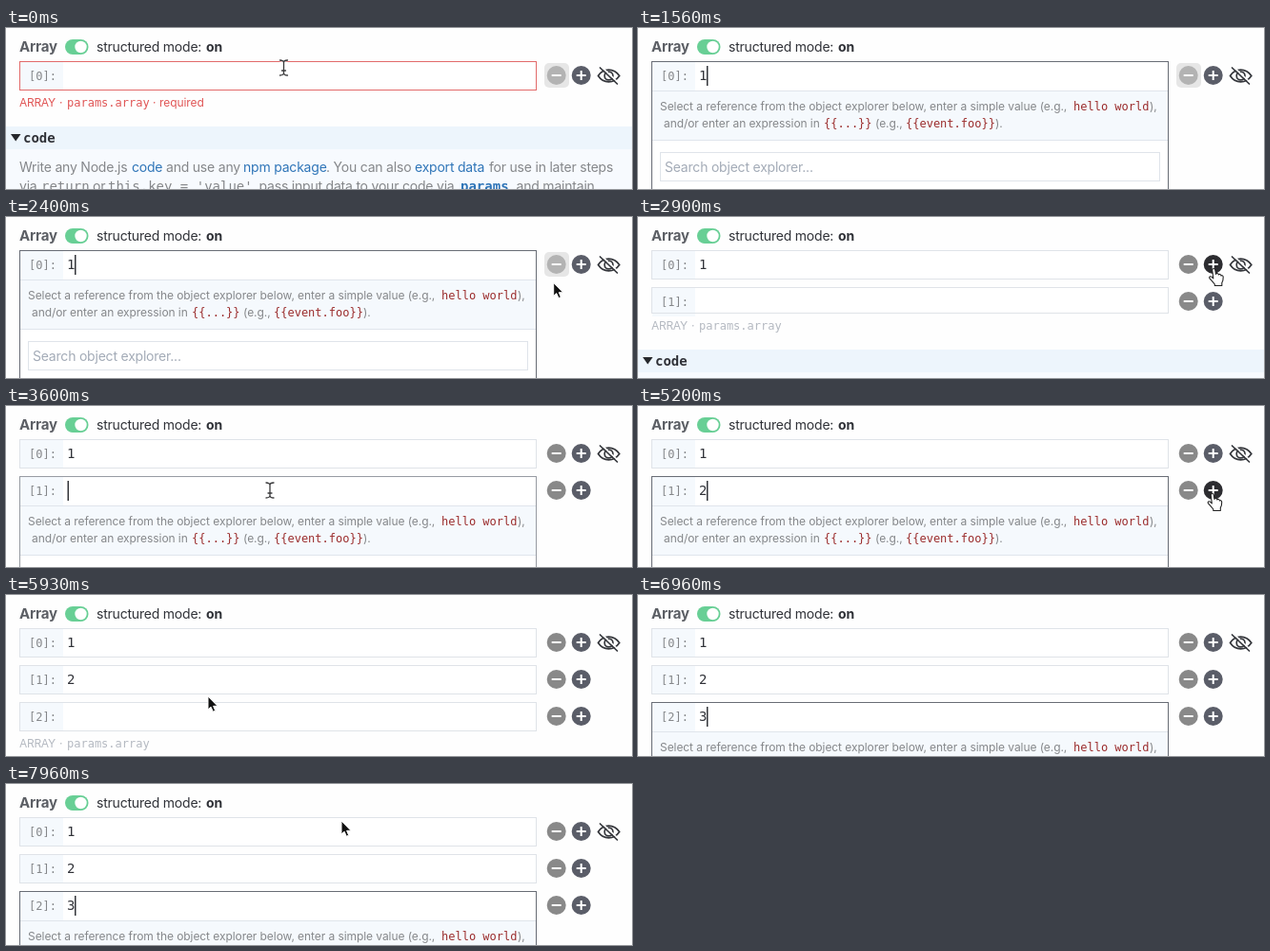
Animation, 657 px wide and 170 px high, one loop 8 s. Source, as an HTML page:

```html
<!DOCTYPE html>
<html lang="en">
<head>
<meta charset="utf-8">
<title>Structured array input</title>
<style>
  html, body { margin: 0; width: 100%; height: 100%; overflow: hidden; background: #fefefe; }
  svg { display: block; width: 657px; height: 170px; }
  text { font: 14px Inter, sans-serif; letter-spacing: -.21px; fill: #85878a; }
  .dark { fill: #303238; }
  .bold { font-weight: 700; }
  .title { font-size: 15px; font-weight: 700; fill: #5c5f65; }
  .small { font-size: 12px; letter-spacing: -.07px; }
  .caps { font-size: 12px; letter-spacing: -.3px; }
  .mono { font-family: "DejaVu Sans Mono", monospace; letter-spacing: 0; }
  .mono12 { font: 12px "DejaVu Sans Mono", monospace; letter-spacing: 0; }
  .link { fill: #2f75b8; }
  .ref { fill: #9b2c2c; }
  .hint { fill: #a3abb7; }
</style>
</head>
<body>
<svg id="stage" viewBox="0 0 657 170" xmlns="http://www.w3.org/2000/svg"></svg>
<script>
(() => {
const LOOP = 8000;
const PITCH = 38.8;
const GREY = [223, 227, 232], RED = [226, 106, 106], DARK = [104, 108, 117];

// Times at which each row is added, focused, typed into and left.
const rows = [
  { added: -1, focus: 460, caretOff: 930, typed: 1400, blur: 2760 },
  { added: 2900, focus: 3540, caretOff: LOOP, typed: 3900, blur: 5260 },
  { added: 5400, focus: 6310, caretOff: LOOP, typed: 6900, blur: LOOP }
];

// Pointer stops: time, x, y; the pointer hides while typing.
const stops = [
  [0, 291.5, 42], [30, 291, 42.5], [130, 286, 46], [1700, 286, 46], [1960, 545, 84],
  [2160, 545, 84], [2640, 604, 55], [2900, 604.5, 55], [3260, 400, 84],
  [3460, 400, 84], [3600, 277, 89], [4160, 277, 89], [4460, 503, 107],
  [4660, 503, 107], [5120, 603, 93], [5400, 603, 93], [5930, 212, 107],
  [6060, 190, 112], [6200, 190, 112], [6360, 184, 128], [7300, 184, 128],
  [7530, 318, 140], [7700, 318, 140], [7940, 352, 39], [8000, 352, 39]
];
const hidden = [[1400, 1700], [3930, 4160], [6930, 7300]];

const stage = document.getElementById('stage');
const label = (cls, x, y, s) => `<text class="${cls}" x="${x}" y="${y}">${s}</text>`;
const rowTop = i => Math.round(PITCH * i);

const header = `
  ${label('title', 14, 25, 'Array')}
  <rect x="62" y="12" width="24.5" height="16" rx="8" fill="#68cf95"/>
  <circle cx="78.5" cy="20" r="6.2" fill="#fff"/>
  ${label('dark', 95, 25, 'structured mode:')}
  ${label('dark bold', 210, 25, 'on')}
  <g fill="none" stroke="#34363b" stroke-width="1.7" stroke-linecap="round">
    <path d="M621.5 50.5C627 42 638 42 643.8 50.5C638 59 627 59 621.5 50.5Z"/>
    <circle cx="632.6" cy="50.5" r="4.4"/>
    <path d="M625 41.2L643 58" stroke="#fefefe"/>
    <path d="M623.5 42L641.5 59"/>
  </g>`;

const footer = `
  <g id="caption">
    ${label('caps', 14, 83, 'ARRAY')}${label('small', 56, 83, '·')}
    ${label('mono12', 64, 83, 'params.array')}
    <g id="required">${label('small', 154, 83, '·')}${label('small', 161, 83, 'required')}</g>
  </g>
  <rect y="104" width="657" height="24" fill="#edf5fc"/>
  <rect y="128" width="657" height="42" fill="#f7fafe"/>
  <path d="M5 112H15.5L10.2 119.5Z" fill="#26282c"/>
  ${label('mono bold dark', 18, 121, 'code')}
  ${label('', 14, 152, 'Write any Node.js')}
  ${label('link', 132, 152, 'code')}
  ${label('', 168, 152, 'and use any')}
  ${label('link', 249, 152, 'npm package')}
  ${label('', 336, 152, '. You can also')}
  ${label('link', 429, 152, 'export data')}
  ${label('', 507, 152, 'for use in later steps')}
  ${label('', 14, 172, 'via')}
  ${label('mono', 37, 172, 'return')}
  ${label('', 91, 172, 'or')}
  ${label('mono', 107, 172, "this.key = 'value'")}
  ${label('', 258, 172, ', pass input data to your code via')}
  ${label('mono bold link', 477, 172, 'params')}
  ${label('', 528, 172, ', and maintain')}`;

const rowMarkup = i => `
  <g id="row${i}" transform="translate(0 ${rowTop(i)})">
    <rect x="14.5" y="35.5" width="542" height="30" fill="#fff"/>
    <rect x="15" y="36" width="45" height="30" fill="#f5f9fd"/>
    ${label('mono12', 24, 55, `[${i}]:`)}
    <g id="panel${i}">
      <rect x="15" y="66" width="541" height="52" fill="#f5f9fd"/>
      <path d="M15 66.5H556M15 118.5H556" stroke="#e0e5ec"/>
      <rect x="15" y="119" width="541" height="80" fill="#fff"/>
      ${label('small', 23, 87, 'Select a reference from the object explorer below, enter a simple value (e.g.,')}
      ${label('mono12 ref', 457, 87, 'hello world')}
      ${label('small', 537, 87, '),')}
      ${label('small', 27, 105, 'and/or enter an expression in')}
      ${label('mono12 ref', 195, 105, '{{...}}')}
      ${label('small', 249, 105, '(e.g.,')}
      ${label('mono12 ref', 281, 105, '{{event.foo}}')}
      ${label('small', 375, 105, ').')}
      <rect x="23.5" y="131.5" width="524" height="30" fill="#fff" stroke="#dfe4ea"/>
      ${label('hint', 28, 152, 'Search object explorer...')}
    </g>
    <rect id="frame${i}" x="14.5" y="35.5" width="542" height="30" fill="none"/>
    <text id="value${i}" class="mono dark" x="64" y="55">${i + 1}</text>
    <rect id="caret${i}" y="40" width="1.5" height="21" fill="#33353a"/>
    <rect id="off${i}" x="565" y="37" width="26" height="26" rx="5" fill="#e6e6e6"/>
    <circle id="minus${i}" cx="577.7" cy="50" r="10"/>
    <circle id="plus${i}" cx="603.7" cy="50" r="10"/>
    <path d="M572.7 50H582.7M598.7 50H608.7M603.7 45V55" stroke="#fff" stroke-width="2"/>
  </g>`;

const beamPath = 'M-4 -8C-1.5 -8 0 -7 0 -5.5C0 -7 1.5 -8 4 -8M0 -6V6M-4 8C-1.5 8 0 7 0 5.5C0 7 1.5 8 4 8M-2 3H2';
const pointers = `
  <g id="beam" fill="none" stroke-linecap="round">
    <path d="${beamPath}" stroke="#fff" stroke-width="2.6"/>
    <path d="${beamPath}" stroke="#3a3a3c" stroke-width="1.3"/>
  </g>
  <path id="arrow" fill="#111" stroke="#fff" stroke-linejoin="round"
    d="M0 0V14L3.1 11.2L5.3 16.2L7.7 15.2L5.6 10.3H10Z"/>
  <path id="hand" fill="#fff" stroke="#222" stroke-width="1.1" stroke-linejoin="round"
    d="M-1.8 1C-1.8 -1.1 1.2 -1.1 1.3 1L2 5.4C2.5 4 4.7 4.3 4.8 6C5.5 4.9 7.3 5.4 7.4 7
       C8.4 6.2 9.7 7 9.7 8.4C9.8 11 9.4 12.5 8.3 14.5V17.5H.8V16C-.8 14 -2.5 12 -4.5 9.8
       C-5.6 8.3 -3.7 7.1 -2.5 8.2L-.7 9.8Z"/>`;

stage.innerHTML = `<rect width="657" height="170" fill="#fefefe"/>${header}
  <g id="footer">${footer}</g>${rows.map((r, i) => rowMarkup(i)).join('')}${pointers}`;

const nodes = {};
stage.querySelectorAll('[id]').forEach(n => { nodes[n.id] = n; });
const set = (id, key, v) => nodes[id].setAttribute(key, v);
const show = (id, on) => set(id, 'display', on ? 'inline' : 'none');
const clamp = v => Math.max(0, Math.min(1, v));
const mix = (a, b, k) => `rgb(${a.map((v, i) => Math.round(v + (b[i] - v) * k))})`;

function pointerAt(t) {
  const n = stops.findIndex(s => s[0] > t);
  const [t0, x0, y0] = stops[n - 1], [t1, x1, y1] = stops[n];
  const k = (t - t0) / (t1 - t0);
  const e = k * k * (3 - 2 * k);
  return [x0 + (x1 - x0) * e, y0 + (y1 - y0) * e];
}

// The first row stays red until it has a value.
function frameColour(i, r, t) {
  if (t >= r.blur) return mix(GREY, DARK, 0);
  return i === 0 ? mix(RED, DARK, clamp((t - r.typed + 40) / 160))
                 : mix(GREY, DARK, clamp((t - r.focus + 30) / 150));
}

function render(t) {
  const count = rows.filter(r => t >= r.added).length;
  const [x, y] = pointerAt(t);
  const visible = !hidden.some(([a, b]) => t >= a && t < b);
  let kind = 'arrow', open = false, settle = 0;

  rows.forEach((r, i) => {
    const here = t >= r.added, active = t >= r.focus && t < r.blur;
    const typed = t >= r.typed, dy = rowTop(i);
    show('row' + i, here);
    if (!here) return;
    const fresh = i > 0 && t < r.added + 30;
    if (fresh) settle = 3;
    if (active) open = true;

    const hover = visible && Math.hypot(x - 603.7, y - 50 - dy) < 11;
    if (hover) kind = 'hand';
    else if (x > 60 && x < 556 && y > 40.5 + dy && y < 62 + dy) kind = 'beam';

    show('panel' + i, active);
    show('value' + i, typed);
    show('caret' + i, active && (typed ? (t - r.typed) % 1000 < 500 : t < r.caretOff));
    set('caret' + i, 'x', typed ? 72 : 64.5);
    set('frame' + i, 'height', active ? 200 : fresh ? 27 : 30);
    set('frame' + i, 'stroke', frameColour(i, r, t));
    show('off' + i, count === 1);
    set('minus' + i, 'fill', count === 1 ? '#b3b3b3' : '#898989');
    set('plus' + i, 'fill', hover ? '#2c2c30' : '#5a5d68');
  });

  const error = t < rows[0].typed;
  show('footer', !open);
  set('footer', 'transform', `translate(0 ${rowTop(count - 1) - settle})`);
  show('required', error);
  nodes.caption.querySelectorAll('text').forEach(n => { n.style.fill = error ? '#e05555' : '#b4b9c1'; });

  ['beam', 'arrow', 'hand'].forEach(k => {
    show(k, visible && k === kind);
    set(k, 'transform', `translate(${x.toFixed(2)} ${y.toFixed(2)})`);
  });
}

const start = performance.now();
function tick() {
  render((performance.now() - start) % LOOP);
  requestAnimationFrame(tick);
}
render(0);
requestAnimationFrame(tick);
})();
</script>
</body>
</html>
```
